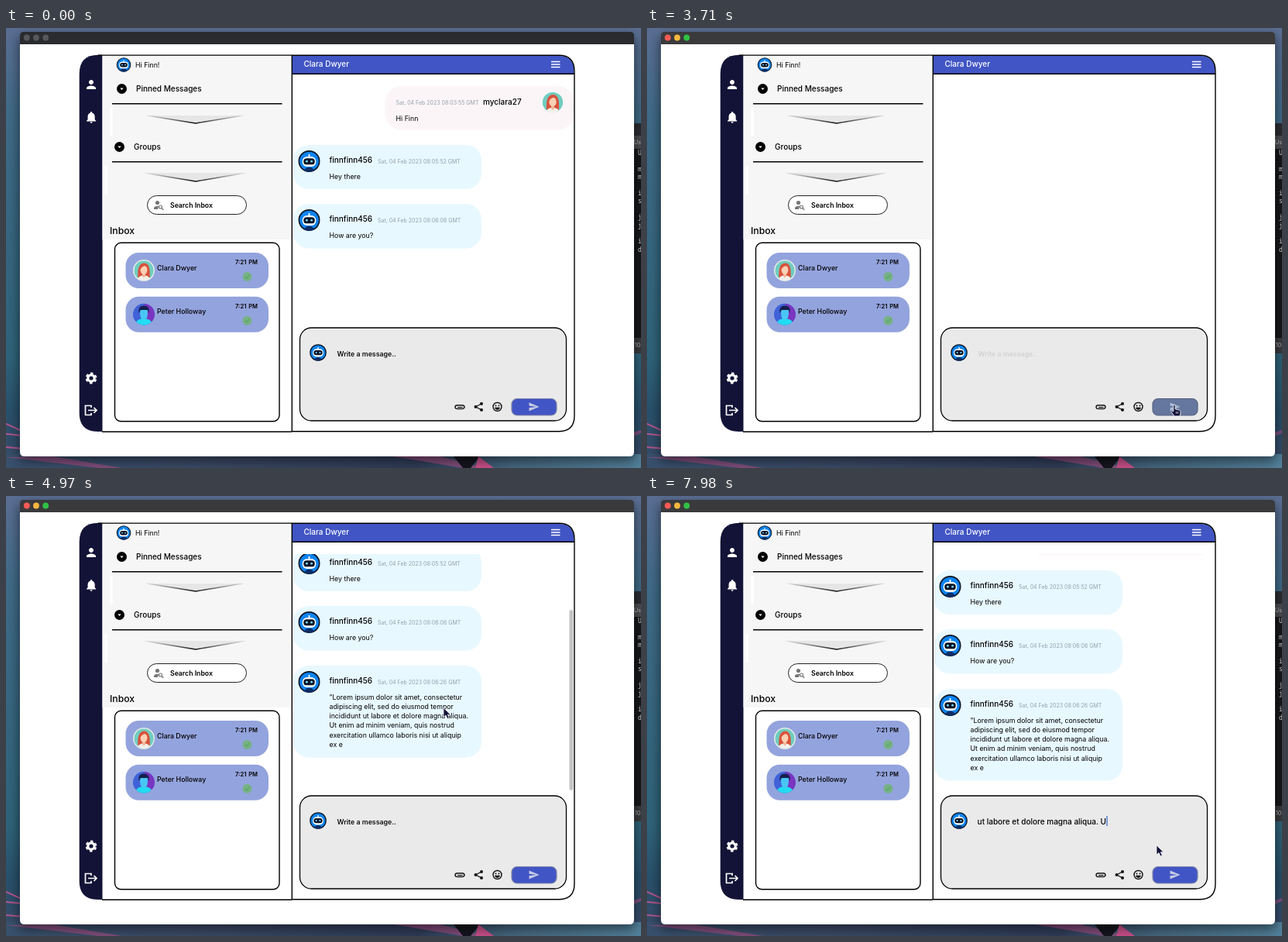
Recreate the animation shown at these times as an HTML page. Size 820x568 px, loop 8000 ms.

```html
<!DOCTYPE html>
<html lang="en">
<head>
<meta charset="utf-8">
<title>Chat demo</title>
<style>
html, body { margin: 0; width: 100%; height: 100%; overflow: hidden; }
svg { display: block; }
text { font-family: Inter, sans-serif; font-size: 8.8px; white-space: pre; }
.m { font-weight: 500; }
.b { font-weight: 600; }
.big { font-size: 10px; }
.date { font-size: 7px; fill: #93a0ab; }
.time { font-size: 7.5px; font-weight: 600; word-spacing: 1px; }
.term { font: 8px "Noto Sans Mono", monospace; fill: #ddd; }
.line { fill: none; stroke-linecap: round; stroke-linejoin: round; }
#shadow { filter: blur(7px); }
</style>
</head>
<body>
<svg id="stage" width="820" height="568" viewBox="0 0 820 568">
<defs>
  <linearGradient id="sky" x2="0" y2="1">
    <stop offset="0" stop-color="#5a6d92"/><stop offset=".2" stop-color="#3f6a87"/>
    <stop offset=".75" stop-color="#2f6379"/><stop offset=".87" stop-color="#28506a"/>
    <stop offset="1" stop-color="#3a4a68"/>
  </linearGradient>
  <linearGradient id="floor">
    <stop offset="0" stop-color="#38506c"/><stop offset=".3" stop-color="#3c4a66"/>
    <stop offset=".65" stop-color="#2f3c58"/><stop offset=".8" stop-color="#46687f"/>
    <stop offset="1" stop-color="#52809a"/>
  </linearGradient>
  <linearGradient id="crease">
    <stop offset="0" stop-color="#222" stop-opacity="0"/><stop offset=".5" stop-color="#111"/>
    <stop offset="1" stop-color="#222" stop-opacity="0"/>
  </linearGradient>
  <linearGradient id="glass">
    <stop offset="0" stop-color="#64727f"/><stop offset=".25" stop-color="#7f828a"/>
    <stop offset=".6" stop-color="#929397"/><stop offset="1" stop-color="#9a9a9d"/>
  </linearGradient>
  <linearGradient id="dusk">
    <stop offset=".45" stop-color="#3f62d8"/><stop offset=".6" stop-color="#7a35c0"/>
  </linearGradient>
  <clipPath id="disc"><circle r="10"/></clipPath>
  <clipPath id="feed"><rect x="370" y="75" width="363.500" height="305"/></clipPath>
  <clipPath id="field"><rect x="426.500" y="408" width="169" height="24"/></clipPath>

  <g id="robot">
    <circle r="9.400" fill="#0d84f0" stroke="#0a1626" stroke-width="1.200"/>
    <path d="M0-6.500V-4" stroke="#fff" stroke-width="1.300"/>
    <path d="M-4.500 9Q-4 5.500 0 5.500T4.500 9Q0 10.500-4.500 9Z" fill="#0c2d66"/>
    <rect x="-6.300" y="-4.300" width="12.600" height="9.300" rx="4.300" fill="#fff"/>
    <rect x="-5.200" y="-2.700" width="10.400" height="5.800" rx="2.800" fill="#0b1426"/>
    <circle cx="-2.200" cy=".1" r="1" fill="#7fdcff"/><circle cx="2.200" cy=".1" r="1" fill="#7fdcff"/>
  </g>
  <g id="woman" clip-path="url(#disc)">
    <circle r="10" fill="#70cdbf"/>
    <path d="M-6 7Q-7-7 0-7.500T6 7Z" fill="#d9523d"/>
    <path d="M-7 11Q-6 5 0 5T7 11Z" fill="#f4f0ec"/>
    <path d="M-1.500 2H1.500V6L0 7.500-1.500 6Z" fill="#efb899"/>
    <ellipse cy="-.5" rx="3.500" ry="4.500" fill="#fbd0b3"/>
    <path d="M-4 0Q-3-4 2-5Q4-3 4 0Q5-7 0-7T-4 0Z" fill="#d9523d"/>
  </g>
  <g id="man" clip-path="url(#disc)">
    <circle r="10" fill="url(#dusk)"/>
    <path d="M-8 11Q-8 5-2 4H2Q8 5 8 11Z" fill="#22dcf2"/>
    <path d="M-3.500-4H3.500V0Q3 5 0 5T-3.500 0Z" fill="#49c5f4"/>
    <path d="M-4.500-1Q-6-8 0-8T4.500-1L3.500-4H-3Z" fill="#16204f"/>
  </g>
  <g id="drop"><circle r="6.500"/><path d="M-2.200-1H2.200L0 1.500Z" fill="#fff"/></g>
  <g id="tick"><circle r="6" fill="#76b283"/><path class="line" d="M-2.500 0-.7 2 3-2" stroke="#5fa56c" stroke-width="1.300"/></g>
  <path id="skip" d="M0-6 12 0 0 6ZM11-6 23 0 11 6Z" fill="#fff"/>
</defs>

<!-- desktop -->
<rect width="820" height="568" fill="url(#sky)"/>
<rect y="550" width="820" height="18" fill="url(#floor)"/>
<path class="line" d="M0 511 20 520M0 524 20 526M0 541 22 543" stroke="#b3568c" stroke-width="2"/>
<path d="M0 554 60 553 150 568H120ZM500 553H560L620 568H590ZM811 522 820 519V523L811 527Z" fill="#b04f88" opacity=".6"/>
<path d="M578 553H612L600 568H590Z" fill="#15151f"/>
<path d="M610 553 630 568H606Z" fill="#c9508a"/>
<g>
  <rect x="809" y="123" width="11" height="297" fill="#17181a"/>
  <rect x="809" y="123" width="11" height="16" fill="#2b2d31"/>
  <rect x="809" y="139" width="11" height="17" fill="#4b4d50"/>
  <rect x="809" y="400" width="11" height="20" fill="#3a3b3e"/>
  <text x="811" y="150" style="font-size:7px" fill="#bbb">Use</text>
  <text x="812" y="412" style="font-size:7px" fill="#bbb">10</text>
  <g id="term"></g>
</g>

<!-- browser window -->
<rect id="shadow" x="16" y="10" width="797" height="550" rx="8" opacity=".45"/>
<path d="M18 21V10Q18 5 23 5H806Q811 5 811 10V21Z" id="bar"/>
<g id="lights"><circle cx="26.800" cy="12.500" r="3.900"/><circle cx="39" cy="12.500" r="3.900"/><circle cx="51.200" cy="12.500" r="3.900"/></g>
<path d="M18 21H811V547Q811 553 805 553H24Q18 553 18 547Z" fill="#fff"/>

<!-- side rail -->
<path d="M124.500 34.700H119Q94.700 34.700 94.700 59V497Q94.700 521 119 521H124.500Z" fill="#121336"/>
<g fill="#fff">
  <path transform="translate(101 64) scale(.75)" d="M12 12c2.210 0 4-1.790 4-4s-1.790-4-4-4-4 1.790-4 4 1.790 4 4 4zm0 2c-2.670 0-8 1.340-8 4v2h16v-2c0-2.660-5.330-4-8-4z"/>
  <path transform="translate(101 106) scale(.76)" d="M12 22c1.100 0 2-.9 2-2h-4c0 1.100.9 2 2 2zm6-6v-5c0-3-1.600-5.600-4.500-6.300V4c0-2-3-2-3 0v.7C7.600 5.400 6 8 6 11v5l-2 2v1h16v-1l-2-2z"/>
</g>
<g fill="none" stroke="#fff">
  <circle cx="110" cy="452" r="4.200" stroke-width="3.200"/>
  <circle cx="110" cy="452" r="6.200" stroke-width="2.400" stroke-dasharray="3.400 3.092" transform="rotate(14.300 110 452)"/>
  <path d="M110 490V487.500H102.500V499.500H110V497M106 493.500H117M113.500 490 117 493.500 113.500 497" stroke-width="1.700"/>
</g>

<!-- left panel -->
<rect x="124.500" y="35" width="244.500" height="238" fill="#f6f6f6"/>
<path d="M136 103V140M129 178V215" stroke="#fff" stroke-width="3"/>
<path d="M119 35.200H369" stroke="#000" stroke-width="1.200"/>
<path d="M124 521.300H369" stroke="#000" stroke-width="1.400"/>
<use href="#robot" transform="translate(152 47.500) scale(.93)"/>
<text x="167" y="51">Hi Finn!</text>
<use href="#drop" x="149.500" y="78.500"/>
<text class="m big" x="168" y="82">Pinned Messages</text>
<use href="#drop" x="146.500" y="153.500"/>
<text class="m big" x="165" y="157">Groups</text>
<path d="M137 97.800H356.500M137 172.800H356.500" stroke="#000" stroke-width="1.500"/>
<path d="M182 113H306L245 123ZM178 187H310L245 198Z" fill="#e6e6e6"/>
<path d="M182 113 245 123 306 113M178 187 245 198 310 187" class="line" stroke="url(#crease)" stroke-width="1.300"/>
<rect x="182.500" y="216.500" width="128" height="24" rx="12" fill="#fff" stroke="#222"/>
<g fill="#777">
  <circle cx="195.500" cy="225.500" r="2.600"/><path d="M191 234V232Q192 229.500 197 229.700L196 234Z"/>
  <path class="line" d="M201 232.500 203 234.500" stroke="#777" stroke-width="1.300"/>
  <circle cx="199.500" cy="231" r="2" fill="none" stroke="#777" stroke-width="1.200"/>
</g>
<text class="b" x="212" y="231.500" style="font-size:8.700px">Search Inbox</text>
<text class="m" x="134" y="266" style="font-size:12.200px">Inbox</text>
<rect x="140.500" y="277.300" width="212.500" height="230.500" rx="8" fill="#fff" stroke="#000" stroke-width="1.400"/>
<g id="inbox"></g>

<!-- chat panel -->
<path d="M369.500 35.500H714Q734 35.500 734 56V500.500Q734 520.700 714 520.700H369.500Z" fill="#fff"/>
<path d="M369.500 36H714Q733.500 36 733.500 56V59H369.500Z" fill="#4155c4"/>
<path d="M369.500 59.200H734" stroke="#000" stroke-width="1.500"/>
<text class="m big" x="384.500" y="50" fill="#fff">Clara Dwyer</text>
<path d="M704 43.500H715.500M704 47H715.500M704 50.500H715.500" stroke="#fff" stroke-width="1.500"/>
<g clip-path="url(#feed)"><g id="list"></g></g>
<rect id="thumb" x="727.500" width="4.800" rx="2.400" fill="#c3c3c3"/>
<path d="M369.300 35.200H714Q734 35.200 734 56V500.500Q734 520.700 714 520.700H369.300Z" fill="none" stroke="#000" stroke-width="1.400"/>

<!-- composer -->
<rect x="379.500" y="387" width="344" height="120" rx="15" fill="#eaeaea" stroke="#000" stroke-width="1.300"/>
<use href="#robot" transform="translate(403 419) scale(1.080)"/>
<text id="hint" class="b" x="427.500" y="423.500">Write a message..</text>
<g clip-path="url(#field)" id="entry">
  <text id="typed" class="m big" x="593" y="423.500" text-anchor="end"></text>
  <path d="M594 413V426" stroke="#2f62c9" stroke-width="1.200"/>
</g>
<g class="line" stroke="#111" stroke-width="1.400">
  <path d="M583.500 489.600H589M590 487H582.500Q580 487 580 489.300T582.500 491.600H589.500Q592 491 592 489.200T589.500 487"/>
  <path d="M614 485 606.500 489 614 493"/>
  <circle cx="634.500" cy="489" r="5.500"/><path d="M631.800 490.500Q634.500 494 637.200 490.500Z" fill="#111"/>
</g>
<g fill="#111">
  <circle cx="614" cy="485" r="2"/><circle cx="606.500" cy="489" r="2"/><circle cx="614" cy="493" r="2"/>
  <circle cx="632.500" cy="487.500" r="1"/><circle cx="636.500" cy="487.500" r="1"/>
</g>
<rect id="send" x="653" y="478.500" width="58" height="21.500" rx="7" stroke-width="1.200"/>
<path id="plane" transform="translate(674.300 481.600) scale(.62)" d="M2 21 23 12 2 3V10L17 12 2 14Z"/>

<!-- pointers -->
<g id="arrow"><path d="M0 0V12L3 9.500 5 14 7.300 13 5.300 8.700H9Z" fill="#14143a" stroke="#fff" stroke-width=".7"/></g>
<g id="beam" class="line" stroke="#333" stroke-width="1.200"><path d="M-3-7Q0-7 0-5Q0-7 3-7M0-5V5M-3 7Q0 7 0 5Q0 7 3 7M-1.500 1H1.500"/></g>
<g id="hand"><path d="M-1.200 0Q0-1.500 1.200 0V5L6.500 6.200Q8.500 7 8 10L7 14H0L-4 8.500Q-3.500 6.500-1.200 8Z" fill="#14143a" stroke="#fff" stroke-width=".8"/><path d="M2.500 8V11M4.500 8V11" stroke="#aab"/></g>

<!-- player overlay -->
<g id="player">
  <rect width="820" height="20" fill="#29292b"/>
  <circle cx="8.500" cy="5" r="6.200" fill="#fe5f57"/><circle cx="29" cy="5" r="6.200" fill="#febc2e"/><circle cx="49" cy="5" r="6.200" fill="#28c840"/>
  <text x="410" y="9" text-anchor="middle" fill="#a2a2a4" style="font-size:13px;font-weight:700">Untitled (Screen Recording 2023-02-04 at 1.54.43 AM copy)</text>
  <rect x="3" y="489" width="457" height="73" rx="8" fill="url(#glass)"/>
  <use href="#skip" transform="translate(204 512) scale(-1 1)"/>
  <use href="#skip" x="259" y="512"/>
  <path d="M222 500 244 513 222 526Z" fill="#fff" stroke="#5d86c9" stroke-width="5" stroke-linejoin="round"/>
  <path d="M222 500 244 513 222 526Z" fill="#fff" stroke="#fff" stroke-linejoin="round"/>
  <g class="line" stroke="#fff" stroke-width="1.400">
    <path d="M348 515H344.500V504.500H359.500V515H356"/><path d="M352 513 356.500 518.500H347.500Z" fill="#fff"/>
    <path d="M389 516.500H385Q382.500 516.500 382.500 514V506.500Q382.500 504 385 504H396Q398.500 504 398.500 506.500V509M386 507 390 511M390 508V511H387"/>
    <rect x="390.500" y="511.500" width="12" height="8" rx="1.500" fill="#fff"/>
    <path d="M434.500 506.500 440 512 434.500 517.500M441.500 506.500 447 512 441.500 517.500"/>
  </g>
  <rect x="64" y="543.500" width="335" height="3" rx="1.500" fill="#b4b4b7"/>
  <rect x="64" y="543.500" width="302" height="3" rx="1.500" fill="#e6e8ea"/>
  <rect x="364.500" y="537.500" width="3.200" height="15" rx="1.500" fill="#fff"/>
  <g fill="#fff" class="m"><text x="16" y="549" style="font-size:12.200px">11:29</text><text x="414.500" y="549" style="font-size:12.200px">12:40</text></g>
  <circle cx="803.500" cy="547" r="12.300" fill="#35373c"/>
  <path class="line" d="M798 545V541.500H801.500M805.500 541.500H809V545M809 549V552.500H805.500M801.500 552.500H798V549M801 545H806M801 547.300H806M801 549.500H804" stroke="#ddd" stroke-width="1.200"/>
</g>
</svg>

<script>
const $ = id => document.getElementById(id);
const show = (id, on) => $(id).style.display = on ? '' : 'none';
const label = (x, y, s, cls = '') => `<text x="${x}" y="${y}" class="${cls}">${s}</text>`;
const avatar = (id, x, y, r) => `<use href="#${id}" transform="translate(${x} ${y}) scale(${r / 10})"/>`;

const lines = ['"Lorem ipsum dolor sit amet, consectetur', 'adipiscing elit, sed do eiusmod tempor',
  'incididunt ut labore et dolore magna aliqua.', 'Ut enim ad minim veniam, quis nostrud',
  'exercitation ullamco laboris nisi ut aliquip', 'ex e'];
const draft = lines.join(' ');
const stamp = s => `Sat, 04 Feb 2023 ${s} GMT`;

function reply(y, time, rows, h) {
  return `<rect x="371" y="${y}" width="243" height="${h}" rx="20" fill="#e8f8ff"/>` +
    avatar('robot', 391.5, y + 21, 14) + label(417.5, y + 23, 'finnfinn456', 'm big') +
    label(480, y + 23.5, stamp(time), 'date') +
    rows.map((s, i) => label(417.5, y + 43.7 + i * 12.2, s)).join('');
}

$('list').innerHTML =
  '<rect x="490" y="75" width="243" height="56.500" rx="20" fill="#fbf5f8"/>' +
  avatar('woman', 706, 96, 13.3) + label(503.5, 99, stamp('08:03:55'), 'date') +
  label(616, 98.5, 'myclara27', 'm big') + label(503.5, 119.5, 'Hi Finn') +
  reply(151, '08:05:52', ['Hey there'], 57) +
  reply(227, '08:06:06', ['How are you?'], 57.5) +
  `<g id="latest">${reply(304, '08:06:26', lines, 118.5)}</g>`;

$('inbox').innerHTML = [['Clara Dwyer', 'woman', 290], ['Peter Holloway', 'man', 346.7]].map(([name, pic, y]) =>
  `<rect x="154.500" y="${y}" width="184.500" height="46" rx="17" fill="#93a3dd"/>
   <circle cx="178" cy="${y + 23}" r="14" fill="${pic == 'woman' ? '#e4ebe8' : '#5f78d8'}"/>` +
  avatar(pic, 178, y + 23, pic == 'woman' ? 12.7 : 14) + label(195, y + 22.5, name, 'm') +
  label(296, y + 15.3, '7:21 PM', 'time') + `<use href="#tick" x="311.500" y="${y + 31}"/>`).join('');

$('term').innerHTML = [...'Ummisjjid'].map((c, i) =>
  label(816, [164, 185, 195, 216, 226, 247, 258, 278, 289][i], c, 'term')).join('');

// Eased value between [time, value] keys
function track(keys, t, ease = u => u * u * (3 - 2 * u)) {
  const i = keys.findIndex(k => k[0] > t);
  if (i < 0) return keys[keys.length - 1][1];
  if (!i) return keys[0][1];
  const [t0, a] = keys[i - 1], [t1, b] = keys[i];
  return a + (b - a) * ease((t - t0) / (t1 - t0));
}

const clamp = (v, lo, hi) => Math.min(hi, Math.max(lo, v));
const path = [[2100, 610, 330], [2450, 521, 437], [3080, 521, 437], [3500, 681, 487], [3780, 681, 487],
  [4200, 565, 273.5], [5460, 565, 273.5], [5740, 521, 437], [7000, 521, 437], [7630, 658, 451]];
const pathX = path.map(p => [p[0], p[1]]), pathY = path.map(p => [p[0], p[2]]);
const scrollKeys = [[4200, 0], [4340, -5.5], [4480, 0], [4900, 84], [4970, 85], [5320, 55]];
const mid = draft.indexOf('ullamco') + 3, end = draft.indexOf('Ut enim') + 1, all = draft.length;
const eraseKeys = [[5810, all], [6160, all - 18], [6300, all - 18], [6580, mid], [6860, mid - 12],
  [6930, mid - 12], [7700, mid - 44], [7770, mid - 44], [7980, end]];
const maxScroll = 55, view = 305;

function draw(t) {
  const active = t >= 2030, busy = t >= 3640 && t < 3990;
  $('bar').setAttribute('fill', active ? '#3a3a3c' : '#292b2e');
  [...$('lights').children].forEach((c, i) =>
    c.setAttribute('fill', active ? ['#fb5a55', '#f5b83d', '#30c244'][i] : '#55575a'));

  const fade = clamp(Math.min((t - 560) / 280, 1 - (t - 1540) / 280), 0, 1);
  $('player').style.opacity = fade;

  const scroll = track(scrollKeys, t);
  const over = Math.max(-scroll, scroll - maxScroll, 0);
  const len = 258.5 - over * .85;
  show('list', !busy);
  show('latest', t >= 3990);
  $('list').setAttribute('transform', `translate(0 ${-scroll})`);
  show('thumb', t >= 4200 && t < 5460);
  $('thumb').setAttribute('y', 75 + clamp(scroll / maxScroll, 0, 1) * (view - len));
  $('thumb').setAttribute('height', len);

  const typing = t >= 2730 && t < 3640 || t >= 5740;
  const count = Math.round(track(eraseKeys, t, u => u));
  show('entry', typing);
  show('hint', !typing);
  $('typed').textContent = draft.slice(0, count);
  $('hint').setAttribute('fill', busy ? '#d2d2d2' : '#111');
  $('send').setAttribute('fill', busy ? '#66779f' : '#4255c5');
  $('send').setAttribute('stroke', busy ? '#566180' : '#8088a6');
  $('plane').setAttribute('fill', busy ? '#a9bbd6' : '#c6cce4');

  const x = track(pathX, t), y = track(pathY, t);
  const kind = x > 652 && y > 478 ? 'hand' : x < 596 && y > 408 && y < 440 ? 'beam' : 'arrow';
  for (const id of ['hand', 'beam', 'arrow']) {
    show(id, t >= 2100 && id == kind);
    $(id).setAttribute('transform', `translate(${x} ${y})`);
  }
}

const step = 70, loop = 8000;
function tick() {
  draw(Math.floor(performance.now() % loop / step) * step);
  requestAnimationFrame(tick);
}
tick();
</script>
</body>
</html>
```
